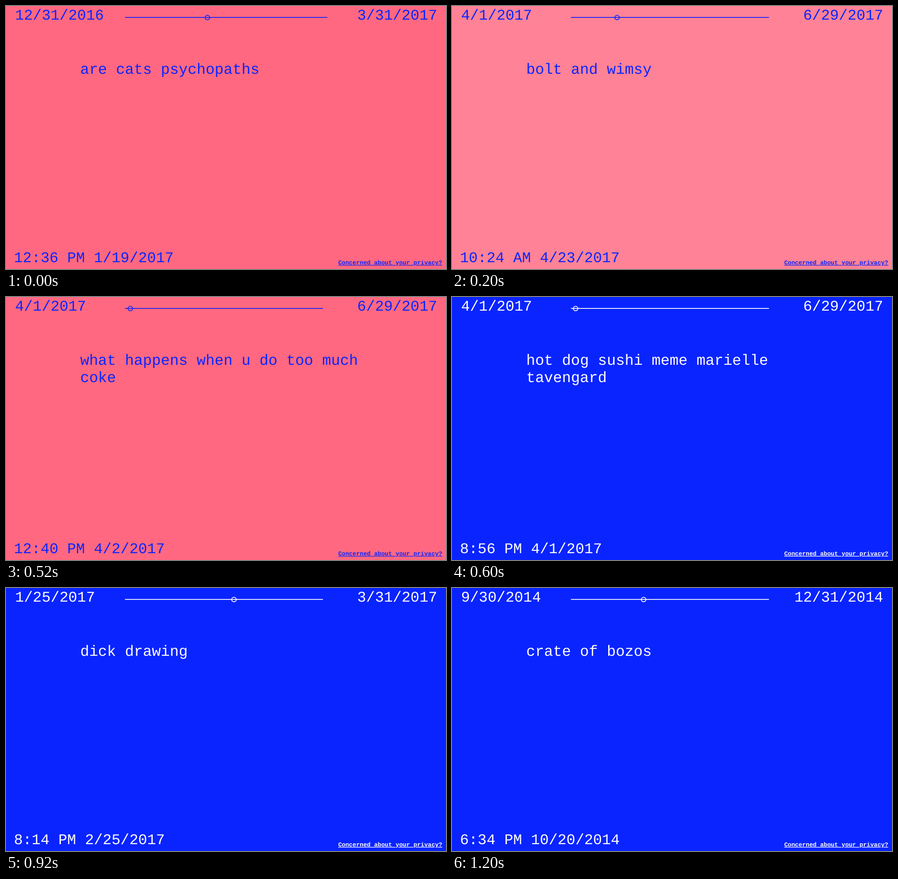
Animation of 969 by 578 pixels, one loop 1400 ms. Source, as an HTML page:

```html
<!DOCTYPE html>
<html lang="en">
<head>
<meta charset="utf-8">
<title>Search history</title>
<style>
  html, body { margin: 0; width: 100%; height: 100%; overflow: hidden; }
  svg { display: block; width: 969px; height: 578px; }
  text {
    font: 32.6px "Liberation Mono", monospace;
    fill: currentColor;
    text-rendering: geometricPrecision;
  }
  .query { font-size: 32.9px; }
  .link { font-size: 13.17px; font-weight: bold; text-decoration: underline; }
  .slider { fill: none; stroke: currentColor; stroke-width: 1.8; }
</style>
</head>
<body>
<svg id="stage" viewBox="0 0 969 578">
  <text id="from" x="20" y="30"></text>
  <text id="to" x="949.5" y="30" text-anchor="end"></text>
  <g class="slider">
    <path id="track"/>
    <circle id="knob" cy="25.3" r="5"/>
  </g>
  <text id="line0" class="query" x="163.4" y="149"></text>
  <text id="line1" class="query" x="163.4" y="187"></text>
  <text id="stamp" x="17.5" y="563"></text>
  <text class="link" x="731.7" y="568">Concerned about your privacy?</text>
</svg>
<script>
const STEP = 200;
const BLUE = '#0a24ff', PINK = '#ff6880', WHITE = '#ffffff';

// background, ink, range start, range end, track end, knob, time stamp, query lines
const pages = [
  [PINK, BLUE, '12/31/2016', '3/31/2017', 707.5, 443.5, '12:36 PM 1/19/2017', 'are cats psychopaths'],
  ['#ff8296', BLUE, '4/1/2017', '6/29/2017', 698, 363.6, '10:24 AM 4/23/2017', 'bolt and wimsy'],
  [PINK, BLUE, '4/1/2017', '6/29/2017', 698, 273.8, '12:40 PM 4/2/2017', 'what happens when u do too much', 'coke'],
  [BLUE, WHITE, '4/1/2017', '6/29/2017', 698, 272.2, '8:56 PM 4/1/2017', 'hot dog sushi meme marielle', 'tavengard'],
  [BLUE, WHITE, '1/25/2017', '3/31/2017', 698, 502, '8:14 PM 2/25/2017', 'dick drawing'],
  ['#4f42e8', '#b8b3f7', '9/30/2014', '12/31/2014', 698, 574.3, '4:54 PM 11/16/2014', 'what is 12 ponies of salt about'],
  [BLUE, WHITE, '9/30/2014', '12/31/2014', 698, 422, '6:34 PM 10/20/2014', 'crate of bozos']
];

const $ = id => document.getElementById(id);
const write = (id, value) => { $(id).textContent = value; };
let shown = -1;

function show(index) {
  if (index === shown) return;
  shown = index;
  const [paper, ink, from, to, end, knob, stamp, line0, line1 = ''] = pages[index];
  $('stage').style.color = ink;
  $('stage').style.background = document.body.style.background = paper;
  $('track').setAttribute('d', `M262 25.2H${end}`);
  $('knob').setAttribute('cx', knob);
  Object.entries({ from, to, stamp, line0, line1 }).forEach(([id, value]) => write(id, value));
}

let start = null;
function tick(now) {
  start ??= now;
  show(Math.floor(Math.max(0, now - start) / STEP) % pages.length);
  requestAnimationFrame(tick);
}
show(0);
requestAnimationFrame(tick);
</script>
</body>
</html>
```
